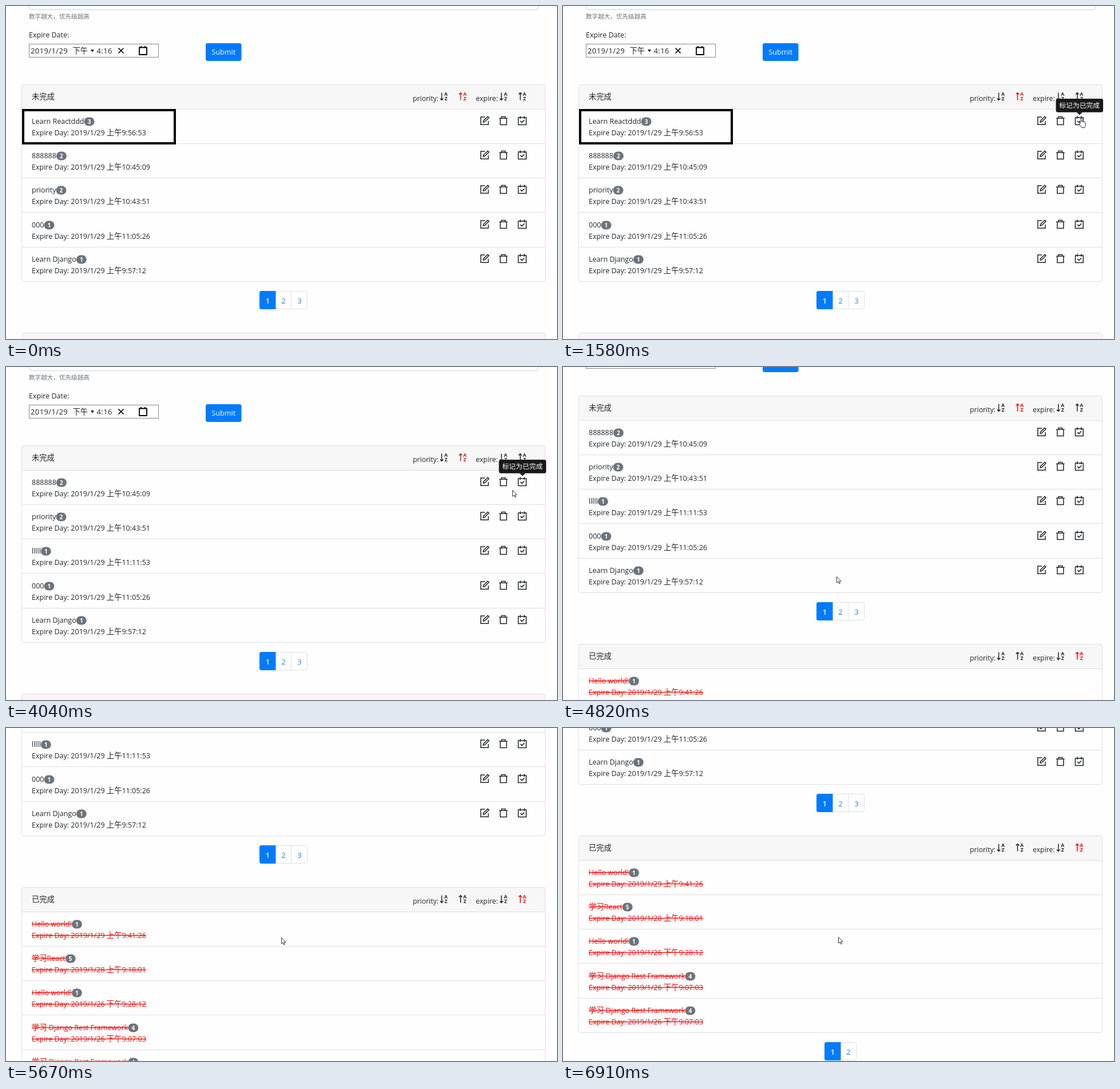
Recreate the animation shown at these times as an HTML page. Size 963 by 582 pixels, loop 8 s.

```html
<!DOCTYPE html>
<html lang="zh-CN">
<head>
<meta charset="utf-8">
<title>Todo list</title>
<style>
  html, body { margin: 0; width: 100%; height: 100%; overflow: hidden; background: #fefefe; }
  svg { display: block; }
  text { font-family: "Open Sans", "Noto Sans", "Noto Sans CJK SC", "Noto Sans CJK", sans-serif; fill: #212529; white-space: pre; }
  tspan { font-weight: 300; }
  .line { fill: none; stroke: #dfdfdf; }
  .icon { fill: none; stroke: #212529; stroke-width: 1.5; }
  .muted { fill: #6c757d; }
  .white, .white tspan { fill: #fff; font-weight: 400; }
  .link { fill: #1683f0; }
  .bold { font-weight: 700; }
  .semi { font-weight: 600; }
  .mid { text-anchor: middle; }
  .done { fill: #f00; text-decoration: line-through; }
  .sort { color: #212529; }
  .sort text { fill: currentColor; }
  .sort path { fill: none; stroke: currentColor; stroke-width: 1.5; }
  .sort.active { color: var(--active); }
  .date { letter-spacing: .4px; }
</style>
</head>
<body>
<svg width="963" height="582" viewBox="0 0 963 582">
  <defs>
    <g id="edit" class="icon"><path d="M9 2H1.8V15.2H15V9M6 11L6.6 8.4L14 1.2L16 3.2L8.6 10.5Z"/></g>
    <g id="trash" class="icon"><path d="M1 4.2H15.6M5 4V1.4H11.6V4M2.8 4.5V15.4H13.8V4.5"/></g>
    <g id="check" class="icon"><path d="M1.4 3H15.2V15.4H1.4ZM4.8 .2V5M11.8 .2V5M5 9L7.6 11.6L12 7.2"/></g>
  </defs>
  <g id="page"></g>
  <g id="tip">
    <path d="M897.5 185.5H908L902.7 190.5Z" fill="#191919"/>
    <rect x="861.5" y="162" width="82.5" height="23.7" rx="3.5" fill="#191919"/>
  </g>
  <circle id="press" cx="905.5" cy="197.5" r="10" fill="#ff0" fill-opacity=".47"/>
  <g id="cursor" stroke="#222" stroke-width=".9" stroke-linejoin="round" fill="#fff">
    <path id="arrow" d="M.5 .5V11.2L3 9L4.8 12.8L6.4 12.1L4.7 8.3H8Z"/>
    <path id="hand" d="M-.9 9V.4a1.2 1.2 0 0 1 2.5 0V5.2q1.2-.9 2.3.2q1.2-.7 2.2.4q1.9-.5 2.2 1.4V11q0 2.2-1.4 3.2V15.6H1V14.4L-2.6 9.8q-.6-1.6 .9-1.6Z"/>
  </g>
</svg>
<script>
const $ = id => document.getElementById(id);
const LOOP = 8000;
const ROW = 60.2;
const ROWS = 5;
const CELL = 28;

const crisp = v => Math.floor(v) + .5;
const repeat = (n, make) => Array.from({ length: n }, (_, i) => make(i)).join('');

// CJK runs are set slightly larger than Latin ones
function text(x, y, str, cls = '', size = 12.5) {
  const body = str.replace(/[\u3000-\u9fff\uff00-\uffef]+/g,
    run => `<tspan font-size="${size * 1.064}">${run}</tspan>`);
  return `<text x="${x}" y="${y}" class="${cls}" font-size="${size}">${body}</text>`;
}

const sortIcon = (x, y, up, active) => `
  <g class="sort ${active ? 'active' : ''}" transform="translate(${x} ${y})">
    <path d="M3.5 1.5V14.5M.7 4.4L3.5 1.5L6.3 4.4" ${up ? '' : 'transform="matrix(1 0 0 -1 0 16)"'}/>
    ${text(11, 7.2, 'A', 'mid bold', 8.6)}${text(11, 15.2, 'Z', 'mid bold', 8.6)}
  </g>`;

function row(top, [title, priority, date], done) {
  const cls = done ? 'done' : '';
  const base = Math.round(top + 25.7);
  return text(45, base, title, cls) +
    `<g class="badge" data-y="${base}">
      <rect y="-11.5" width="18" height="15" rx="7.5" class="muted"/>
      ${text(9, -.3, priority, 'mid bold white', 10)}
    </g>` +
    text(45, base + 20, `Expire Day: 2019/1/${date}`, cls) +
    (done ? '' : ['edit', 'trash', 'check'].map((id, i) => `<use href="#${id}" x="${828 + 33 * i}" y="${base - 14}"/>`).join(''));
}

const rows = (top, items, done) => items.map((item, i) => row(top + i * ROW, item, done)).join('');

function pager(y, count) {
  const left = 485 - count * CELL / 2;
  return `<rect x="${left + .5}" y="${y + .5}" width="${count * CELL - 1}" height="31" rx="3.5" class="line"/>
    <path d="M${left + CELL + .5} ${y}v32h-25a3.5 3.5 0 0 1-3.5-3.5v-25a3.5 3.5 0 0 1 3.5-3.5Z" fill="#007bff"/>` +
    repeat(count, i => (i > 1 ? `<path d="M${left + i * CELL - .5} ${y}v32" class="line"/>` : '') +
      text(left + 14.2 + i * CELL, y + 22, String(i + 1), i ? 'mid link' : 'mid semi white'));
}

function card(top, body, title, active, pages) {
  const bottom = crisp(body + ROWS * ROW);
  const mid = Math.round(body - 22);
  return `<path d="M27.5 ${crisp(body)}V${top + 4}a3.5 3.5 0 0 1 3.5-3.5H939a3.5 3.5 0 0 1 3.5 3.5V${crisp(body)}Z" fill="#f7f7f7"/>
    <rect x="27.5" y="${top + .5}" width="915" height="${bottom - top - .5}" rx="3.5" class="line"/>` +
    repeat(ROWS, i => `<path d="M28 ${crisp(body + i * ROW)}H942" class="line"/>`) +
    text(45, mid + 5, title) +
    text(711, mid + 8.2, 'priority:', '', 12.3) + text(821, mid + 8.2, 'expire:', '', 12.3) +
    repeat(4, i => sortIcon(758 + 33 * (i % 2) + 104.3 * (i >> 1), mid - 8, i % 2, i === active)) +
    pager(bottom + 16.5, pages);
}

const first = ['Learn Reactddd', '3', '29 上午9:56:53'];
const eights = ['888888', '2', '29 上午10:45:09'];
const priority = ['priority', '2', '29 上午10:43:51'];
const ells = ['lllll', '1', '29 上午11:11:53'];
const zeros = ['000', '1', '29 上午11:05:26'];
const django = ['Learn Django', '1', '29 上午9:57:12'];
const rest = ['学习 Django Rest Framework', '4', '26 下午9:07:03'];
const finished = [
  ['Hello world!', '1', '29 上午9:41:26'],
  ['学习React', '5', '28 上午9:18:01'],
  ['Hello world!', '1', '26 下午9:28:12'],
  rest, rest
];

$('page').innerHTML = `
  <rect x="40.5" y="-30" width="890" height="36.5" rx="3.5" fill="#fff" stroke="#ced4da"/>
  ${text(40, 22.3, '数字越大，优先级越高', 'muted', 9.95)}
  ${text(40, 55, 'Expire Date:')}
  <rect x="40.5" y="66.5" width="226" height="23" fill="#fff" stroke="#8a8a8a"/>
  ${text(43, 83, '2019/1/29', 'date', 13)}${text(116.5, 83, '下午')}${text(158.5, 83, '4:16', 'date', 13)}
  <path d="M148 76.2H154L151 80.4Z"/>
  <path d="M196.5 73.5L205.5 82.5M205.5 73.5L196.5 82.5" stroke="#000" stroke-width="1.7"/>
  <path d="M233 72.5H246V85H233ZM236 70V73M243 70V73" fill="none" stroke="#000" stroke-width="1.8"/>
  <rect x="349" y="65" width="62.5" height="31" rx="3.5" fill="#007bff"/>
  ${text(359.3, 85, 'Submit', 'white', 12.7)}
  ${card(137, 180.3, '未完成', 1, 3)}
  ${card(571, 614.2, '已完成', 3, 2)}
  <g id="before">${rows(180.3, [first, eights, priority, zeros, django])}</g>
  <g id="after">${rows(180.3, [eights, priority, ells, zeros, django])}</g>
  ${rows(614.2, finished, true)}
  <rect id="mark" x="30" y="182" width="265" height="58" fill="none" stroke="#000" stroke-width="4"/>`;
$('tip').innerHTML += text(867.3, 178.3, '标记为已完成', 'white', 11.1);

// Each badge sits right after its title
for (const badge of document.querySelectorAll('.badge')) {
  const end = 45 + badge.previousElementSibling.getComputedTextLength();
  badge.setAttribute('transform', `translate(${end} ${badge.dataset.y})`);
}

// A value is the sum of its eased moves: { at, for, by }
const ease = p => p * p * (3 - 2 * p);
const move = (at, time, by) => t => by * ease(Math.min(1, Math.max(0, (t - at) / time)));
const sum = (from, ...moves) => t => moves.reduce((v, m) => v + m(t), from);

const pointerX = sum(851, move(430, 700, 39), move(1200, 200, 15), move(3990, 50, -20), move(4120, 400, -407), move(4825, 55, 3));
const pointerY = sum(600, move(400, 730, -398), move(1200, 200, -5), move(3990, 50, 18), move(4120, 400, 151), move(6890, 20, -1));
const scroll = sum(0, move(4600, 220, 87), move(4820, 300, 160), move(5560, 280, 132), move(5880, 120, 4));
const tipOpacity = sum(0, move(1360, 200, 1), move(3400, 10, -1), move(3420, 150, 1), move(4050, 150, -1));

const show = (id, on) => $(id).setAttribute('visibility', on ? 'visible' : 'hidden');

function draw(now) {
  const t = (now - origin) % LOOP;
  const top = Math.round(scroll(t));
  const hand = t >= 1240 && t < 4000;
  $('page').setAttribute('transform', `translate(0 ${-top})`);
  $('page').style.setProperty('--active', top ? '#f00' : '#c3220c');
  $('cursor').setAttribute('transform', `translate(${pointerX(t)} ${pointerY(t)})`);
  $('tip').setAttribute('opacity', tipOpacity(t));
  show('hand', hand);
  show('arrow', !hand);
  show('press', t >= 2700 && t < 2940);
  show('mark', t < 3170);
  show('before', t < 3410);
  show('after', t >= 3410);
  requestAnimationFrame(draw);
}

const origin = performance.now();
draw(origin);
</script>
</body>
</html>
```
